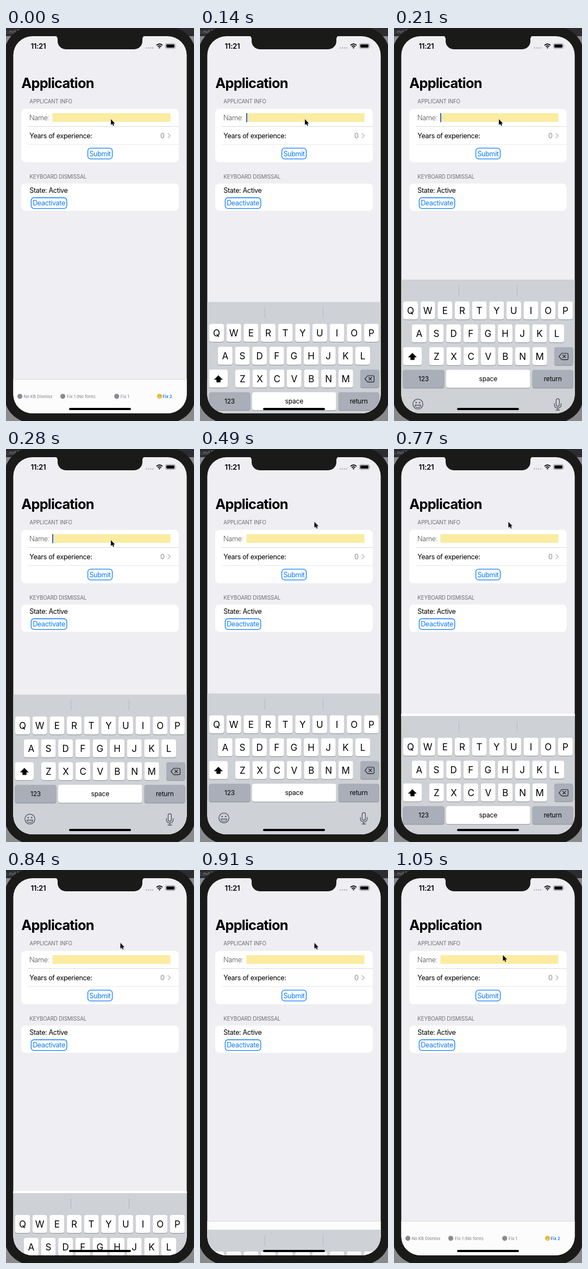
An HTML page that plays this animation: 346 by 720 pixels, repeating every 1.12 s.

```html
<!DOCTYPE html>
<html lang="en">
<head>
<meta charset="utf-8">
<title>Form with keyboard</title>
<style>
  html, body { margin: 0; width: 100%; height: 100%; overflow: hidden; background: #1a1a19; }
  svg { display: block; width: 346px; height: 720px; font-family: Inter, "Liberation Sans", sans-serif; }
  .title { font-size: 25.4px; font-weight: 700; letter-spacing: -.8px; }
  .header { font-size: 9.75px; letter-spacing: -.14px; fill: #6d6d72; }
  .body { font-size: 12.6px; letter-spacing: -.37px; }
  .thin { font-weight: 200; letter-spacing: -.2px; }
  .clock { font-size: 13.3px; font-weight: 600; letter-spacing: -.3px; }
  .tab { font-size: 7.6px; font-weight: 500; fill: #8e8e93; }
  .on { font-weight: 600; fill: #0a7aff; }
  .blue { fill: #0a7aff; }
  .mid { text-anchor: middle; }
  .button { fill: none; stroke: #0a7aff; stroke-width: 1.3; }
  .letter { font-size: 17px; }
  .word { font-size: 12px; letter-spacing: -.2px; }
  .line { fill: none; stroke-linecap: round; stroke-linejoin: round; }

  #keyboard, #strip, #caret, #pointer { animation: 1120ms step-end infinite; }
  #keyboard { animation-name: slide; }
  #strip { animation-name: strip; }
  #caret { animation-name: caret; }
  #pointer { animation-name: point; }

  /* every step lasts 70 ms, 6.25% of the loop */
  @keyframes slide {
    0% { transform: translateY(720px); }
    6.25% { transform: translateY(639px); }
    12.5% { transform: translateY(502px); }
    18.75% { transform: translateY(461px); }
    25% { transform: translateY(450px); }
    31.25% { transform: translateY(448.5px); }
    37.5% { transform: translateY(448px); }
    68.75% { transform: translateY(489px); }
    75% { transform: translateY(592px); }
    81.25% { transform: translateY(659px); }
    87.5% { transform: translateY(690px); }
    93.75%, 100% { transform: translateY(720px); }
  }
  @keyframes strip {
    0% { opacity: 0; }
    68.75% { opacity: 1; }
    81.25%, 100% { opacity: 0; }
  }
  @keyframes caret {
    0% { opacity: 0; }
    6.25% { opacity: 1; }
    43.75%, 100% { opacity: 0; }
  }
  @keyframes point {
    0% { transform: translate(193px, 167px); }
    31.25% { transform: translate(197px, 159px); }
    37.5% { transform: translate(206px, 143px); }
    43.75% { transform: translate(210.5px, 133.5px); }
    87.5% { transform: translate(208px, 143px); }
    93.75%, 100% { transform: translate(200.5px, 156px); }
  }
</style>
</head>
<body>
<svg viewBox="0 0 346 720">
  <defs>
    <clipPath id="screen"><rect x="13.4" y="15" width="319.2" height="691" rx="35"/></clipPath>
  </defs>

  <!-- desktop behind the phone -->
  <rect width="346" height="720" fill="#8a8a8c"/>
  <rect width="346" height="15" fill="#2d2d31"/>
  <text x="-2" y="10" font-size="8.5" fill="#8c8c90">c.md F</text>
  <rect x="-3" y="-2" width="352" height="725" rx="50" fill="#1a1a19"/>

  <g clip-path="url(#screen)">
    <rect x="13" y="15" width="320" height="691" fill="#efeef3"/>

    <!-- status bar -->
    <path d="M89 14 A6 6 0 0 1 95 20 V24 A15 15 0 0 0 110 39 H236 A15 15 0 0 0 251 24 V20 A6 6 0 0 1 257 14 Z" fill="#1a1a19"/>
    <text class="clock" x="45.5" y="38">11:21</text>
    <g fill="#b5b5ba">
      <circle cx="258.3" cy="36.5" r="1.3"/><circle cx="262.2" cy="36.5" r="1.3"/>
      <circle cx="266.1" cy="36.5" r="1.3"/><circle cx="270" cy="36.5" r="1.3"/>
    </g>
    <g class="line" stroke="#000" stroke-width="1.9" style="stroke-linecap:butt">
      <path d="M277 31.6 Q282.5 26.8 288 31.6"/>
      <path d="M279.2 34.1 Q282.5 31.2 285.8 34.1"/>
    </g>
    <path d="M280.7 35.7 Q282.5 34.3 284.3 35.7 L282.5 37.8 Z"/>
    <rect x="293.5" y="28.5" width="18" height="9" rx="2.6" fill="none" stroke="#8d8d90"/>
    <rect x="295" y="30" width="15" height="6" rx="1.4"/>
    <path d="M313 31.5 Q314.6 33 313 34.6 Z" fill="#8d8d90"/>

    <!-- form -->
    <text class="title" x="28.3" y="110">Application</text>
    <text class="header" x="43.3" y="138">APPLICANT INFO</text>
    <rect x="28" y="148" width="290" height="98" rx="8" fill="#fff"/>
    <path d="M40 180.5 H318" stroke="#d8d8da"/>
    <path d="M40 213.5 H318" stroke="#e9e9eb"/>
    <text class="body thin" x="43" y="169">Name:</text>
    <rect x="85.4" y="156" width="217.2" height="16" fill="#fbeca2"/>
    <rect id="caret" x="85" y="156" width="2" height="16.5" fill="#2f66d0"/>
    <text class="body" x="43.3" y="202">Years of experience:</text>
    <text class="body" x="284" y="202" fill="#8a8a8e">0</text>
    <path class="line" d="M298.3 193.3 L302.3 197.3 L298.3 201.3" stroke="#bcbcc0" stroke-width="1.5"/>
    <rect class="button" x="150.6" y="220.2" width="45" height="19.6" rx="5"/>
    <text class="body blue mid" x="173" y="234.6">Submit</text>

    <text class="header" x="43.3" y="276">KEYBOARD DISMISSAL</text>
    <rect x="28" y="285" width="290" height="50" rx="8" fill="#fff"/>
    <text class="body" x="43.3" y="302">State: Active</text>
    <rect class="button" x="46.4" y="311" width="65.4" height="19.6" rx="5"/>
    <text class="body blue mid" x="79" y="325.4">Deactivate</text>

    <!-- tab bar -->
    <rect x="13" y="643" width="320" height="63" fill="#fcfcfd"/>
    <path d="M13 643.5 H333" stroke="#d8d8db"/>
    <g fill="#8a8a8e">
      <circle cx="25.5" cy="674.8" r="4.6"/><circle cx="104.5" cy="674.8" r="4.6"/>
      <circle cx="203.7" cy="674.8" r="4.6"/>
    </g>
    <text class="tab" x="32.5" y="677.6">No KB Dismiss</text>
    <text class="tab" x="112" y="677.6">Fix 1 (No form)</text>
    <text class="tab" x="210.8" y="677.6">Fix 1</text>
    <text class="tab on" x="288.3" y="677.6">Fix 2</text>
    <circle cx="282.6" cy="674.6" r="4.7" fill="#f9c534"/>
    <path d="M280 675.6 H285.2 Q284.8 678 282.6 678 T280 675.6" fill="#fff" stroke="#7c4a12" stroke-width=".4"/>
    <path class="line" d="M280.2 673.2 Q280.9 672 281.6 673.2 M283.6 673.2 Q284.3 672 285 673.2" stroke="#6b3f10" stroke-width=".6"/>

    <g id="keyboard">
      <rect id="strip" x="13" y="-4" width="320" height="5" fill="#fff"/>
      <rect x="13" width="320" height="270" fill="#ced1d6"/>
      <path d="M119.5 10 V29 M226.5 10 V29" stroke="#b4b8be"/>
      <g id="keys"></g>
      <path class="line" d="M34 134.8 L41.2 142 H37.3 V146.8 H30.7 V142 H26.8 Z" stroke="#000" stroke-width=".8" style="fill:#000"/>
      <g class="line" stroke="#1c1c1e" stroke-width="1.1">
        <path d="M308.6 135 H318.2 Q320.4 135 320.4 137.2 V144.4 Q320.4 146.6 318.2 146.6 H308.6 L303.6 140.8 Z"/>
        <path d="M310.6 138 L316 143.4 M316 138 L310.6 143.4"/>
      </g>
      <g class="line" stroke="#50555c" stroke-width="1.3">
        <circle cx="44" cy="228" r="9.2"/>
        <path d="M38.6 230 H49.4 Q48.6 234.4 44 234.4 T38.6 230 Z"/>
        <rect x="298.4" y="218.2" width="6" height="13.8" rx="3"/>
        <path d="M295.2 227 V229 Q295.2 235.2 301.4 235.2 T307.6 229 V227 M301.4 235.2 V239 M298 239 H304.8"/>
      </g>
      <circle cx="40.8" cy="225.4" r="1.3" fill="#50555c"/>
      <circle cx="47.2" cy="225.4" r="1.3" fill="#50555c"/>
    </g>

    <rect x="116" y="696" width="114" height="4" rx="2"/>
  </g>

  <path id="pointer" d="M0 0 V10.8 L2.5 8.5 L4.2 12.3 L6 11.5 L4.3 7.9 H7.5 Z" stroke="#fff" stroke-width=".7" paint-order="stroke"/>
</svg>
<script>
  const keys = document.getElementById("keys");
  const GREY = "#a9aeb8";

  function add(tag, attrs, text = "") {
    const el = document.createElementNS("http://www.w3.org/2000/svg", tag);
    for (const name in attrs) el.setAttribute(name, attrs[name]);
    el.textContent = text;
    keys.append(el);
  }

  function key(x, y, width, label = "", kind = "letter", fill = "#fff") {
    const box = { x, width, height: 33, rx: 4 };
    add("rect", { ...box, y: y + 1, fill: "#8b8e93" });
    add("rect", { ...box, y, fill });
    const baseline = y + (kind === "letter" ? 23.2 : 20.6);
    add("text", { x: x + width / 2, y: baseline, class: kind + " mid" }, label);
  }

  const rows = [["QWERTYUIOP", 17, 40], ["ASDFGHJKL", 32.8, 82], ["ZXCVBNM", 64.8, 123.7]];
  for (const [letters, left, y] of rows)
    [...letters].forEach((c, i) => key(left + i * 31.65, y, 27, c));

  key(16.5, 123.7, 34.5);
  key(295, 123.7, 34.5, "", "word", GREY);
  key(16.5, 165.3, 76, "123", "word", GREY);
  key(96, 165.3, 154.5, "space", "word");
  key(254.7, 165.3, 75, "return", "word", GREY);
</script>
</body>
</html>
```
